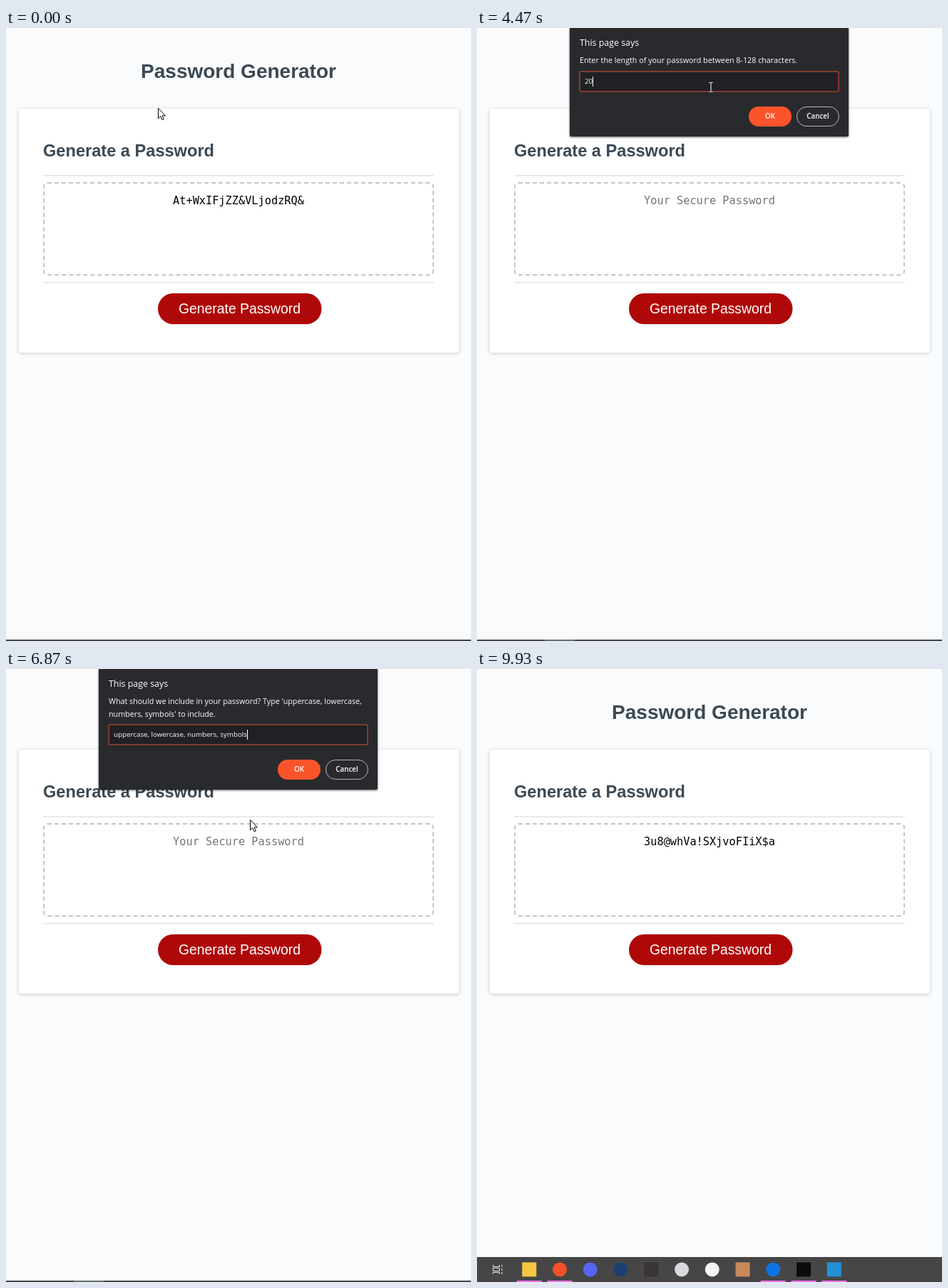
An HTML page for the animation above (9990 ms loop, 652 by 859 pixels).

```html
<!DOCTYPE html>
<html lang="en">
<head>
<meta charset="utf-8">
<title>Password Generator</title>
<style>
html, body { margin: 0; width: 100%; height: 100%; overflow: hidden; background: #fafbfd; }
#stage { position: absolute; left: 0; top: 0; width: 652px; height: 859px; overflow: hidden; isolation: isolate; background: #fafbfd; }
#stage div, #stage svg { position: absolute; box-sizing: border-box; }
.card { left: 17.5px; top: 113px; width: 617px; height: 342px; border-radius: 4px; background: #fff;
  box-shadow: 0 1px 5px rgba(60,64,67,.28); }
.result { left: 52px; top: 216px; width: 548px; height: 131px; border: 2px dashed #c4c5ca; border-radius: 6px; }
.page { left: 0; top: 0; font-family: "Liberation Sans", Arial, sans-serif; }
.page .mono { font: 15.28px "DejaVu Sans Mono", monospace; }

.dialog { left: 130px; top: 0; width: 391px; background: #292a2d; color: #fff; transform-origin: 50% 0;
  border-radius: 0 0 2px 2px; box-shadow: 0 1px 3px rgba(0,0,0,.65); font: 10.75px/17.5px "Open Sans", sans-serif; }
.dialog .says { left: 14px; top: 12px; font-size: 12.4px; white-space: nowrap; }
.dialog .message { left: 14px; top: 37px; white-space: nowrap; }
.dialog .field { left: 13px; right: 13px; bottom: 62px; height: 30px; padding: 0 6px; border: 2px solid #7f3b2b;
  border-radius: 3px; background: #202124; font-size: 9.8px; line-height: 26px; white-space: nowrap; }
.dialog .field.blurred { border: 1px solid #424346; padding: 0 7px; line-height: 28px; background: #232427; }
.field i { display: inline-block; width: 1px; height: 14px; background: #fff; vertical-align: middle; }
.dialog .button { bottom: 14px; width: 60px; height: 28px; border-radius: 14px; text-align: center;
  font-weight: 600; font-size: 9.8px; line-height: 27px; }
.ok { left: 251px; background: #fb542b; }
.cancel { left: 318px; border: 1px solid #b4b5b7; line-height: 25px !important; }

#menu { left: 304px; top: 85px; width: 153px; height: 182px; background: #292a2d; color: #85868a;
  box-shadow: 2px 2px 3px rgba(0,0,0,.6); font: 10.1px/21px "Open Sans", sans-serif; }
#menu .row { left: 0; width: 100%; height: 21px; padding: 0 21px 0 21.5px; display: flex; justify-content: space-between; }
#menu .row.on b { color: #fff; }
#menu .row.on { color: #a3a4a7; }
#menu .row.hover { background: #3d3e42; }
#menu b { font-weight: 400; }
#menu .rule { left: 0; width: 100%; height: 1px; background: #404145; }

#taskbar { left: 0; top: 824px; }
.cursor { left: 0; top: 0; overflow: visible; width: 16px; height: 22px; }
#beam { mix-blend-mode: difference; }
</style>
</head>
<body>
<div id="stage">
  <div class="card"></div>
  <div class="result"></div>
  <svg class="page" width="652" height="859" text-anchor="middle">
    <g fill="#3b4954" font-weight="700">
      <text x="326" y="70" font-size="28">Password Generator</text>
      <text x="52" y="180" font-size="23.6" text-anchor="start">Generate a Password</text>
    </g>
    <path d="M52.500 206.800H600M52.500 356.600H600" stroke="#e6e6e8" stroke-width="1.750"/>
    <text id="password" class="mono" x="326" y="247"></text>
    <rect x="213" y="371.700" width="229.500" height="43.400" rx="21.700" fill="#af0808"/>
    <text x="327.500" y="399.500" font-size="19.350" fill="#fff">Generate Password</text>
  </svg>

  <svg id="taskbar" width="652" height="35">
    <rect width="652" height="35" fill="#464646"/>
    <rect id="active" x="95" width="42" height="35" fill="#6a726f"/>
    <path d="M22.500 11v2.500h9V11M22.500 24v-2.500h9V24M22.500 15.500h9v4h-9zM35 11v3M35 16v3M35 21v3" fill="none" stroke="#eee"/>
    <g id="icons"></g>
  </svg>

  <div class="dialog" id="lengthDialog" style="height:152px">
    <div class="says">This page says</div>
    <div class="message">Enter the length of your password between 8-128 characters.</div>
    <div class="field"><span></span><i></i></div>
    <div class="button ok">OK</div><div class="button cancel">Cancel</div>
  </div>
  <div class="dialog" id="kindDialog" style="height:169px">
    <div class="says">This page says</div>
    <div class="message">What should we include in your password? Type 'uppercase, lowercase,<br>numbers, symbols' to include.</div>
    <div class="field"><span></span><i></i></div>
    <div class="button ok">OK</div><div class="button cancel">Cancel</div>
  </div>
  <div id="menu"></div>

  <svg class="cursor" id="arrow"><path d="M.5.5v14.200l3.200-3 2.400 5.100 2.200-1-2.300-4.900h4.400z" fill="#fff" stroke="#000"/></svg>
  <svg class="cursor" id="beam"><path d="M-3-6.500h2.500l.5.500.5-.5H3M-3 6.500h2.500l.5-.5.5.5H3M0-6V6" fill="none" stroke="#fff" stroke-width="1.200"/></svg>
  <svg class="cursor" id="hand"><g transform="translate(-6)" stroke="#000">
    <path d="M4.500 13.500V2a1.400 1.400 0 0 1 2.800 0v5.500c0-1 2.400-1 2.600.4c.3-1 2.300-.8 2.500.5c.5-.7 2-.4 2 1v4.600c0 2-1.400 3-1.600 5v1.500h-8v-1.400c-.5-2-2.600-4-3.800-6.300c-.8-1.400.8-2.600 2-1.300z" fill="#fff"/>
    <path d="M7.300 7.500V11M9.900 8v3M12.400 8.500V11" fill="none"/></g></svg>
</div>

<script>
const LOOP = 9990, FRAME = 200 / 3;
const $ = id => document.getElementById(id);
const show = (el, on) => { el.style.visibility = on ? 'visible' : 'hidden'; };
const between = (t, a, b) => t >= a && t < b;

// Taskbar items: colour, round or square, running
const items = [
  ['#f5c542', 0, 1], ['#f4502a', 1, 1], ['#5865f2', 1, 0], ['#1b3f70', 1, 0],
  ['#3a3435', 0, 0], ['#d9d9de', 1, 0], ['#f4f4f4', 1, 0], ['#c98a5b', 0, 0],
  ['#0c74e0', 1, 1], ['#0c0c0c', 0, 1], ['#2490d8', 0, 1]
];
$('icons').innerHTML = items.map(([colour, round, running], i) => {
  const x = 73.3 + i * 42.75;
  return `<rect x="${x - 10}" y="7.500" width="20" height="20" rx="${round ? 10 : 1}" fill="${colour}"/>` +
    (running ? `<rect x="${x - 17.5}" y="33" width="35" height="2" fill="#fb70e6"/>` : '');
}).join('');

// Context menu: label, shortcut, enabled; null is a separator
const entries = [['Emoji', 'Win+Period', 1], null, ['Undo', 'Ctrl+Z'], null, ['Cut', 'Ctrl+X'],
  ['Copy', 'Ctrl+C'], ['Paste', 'Ctrl+V', 1], ['Delete', ''], null, ['Select all', 'Ctrl+A']];
let menuY = 3.5;
$('menu').innerHTML = entries.map(entry => {
  const top = menuY;
  menuY += entry ? 21 : 9.5;
  if (!entry) return `<div class="rule" style="top:${Math.round(top + 4)}px"></div>`;
  const [label, keys, on] = entry;
  return `<div class="row ${on ? 'on' : ''}" style="top:${top}px"><b>${label}</b><span>${keys}</span></div>`;
}).join('');
const rows = [...document.querySelectorAll('#menu .row')];

// Pointer path: time, x, y, and the shape held from then on
const path = [
  [0, 213, 112, 'arrow'], [130, 126, 9, 'arrow'], [200, 126, 9, ''],
  [870, 101, 5, 'arrow'], [1130, 290, 32, 'arrow'], [1270, 400, 58, 'beam'], [1330, 424, 62, 'beam'],
  [1400, 410, 69, 'beam'], [1470, 402, 95, 'arrow'], [1600, 375, 225, 'beam'], [1670, 362, 350, 'arrow'],
  [1730, 354, 388, 'hand'], [1800, 350, 408, 'hand'], [1870, 352, 411, 'hand'], [2130, 338, 401, 'hand'],
  [2270, 338, 401, 'hand'], [2400, 414, 428, 'hand'], [2470, 425, 432, 'hand'], [2870, 370, 140, 'arrow'],
  [3000, 335, 88, 'beam'], [3070, 328, 83, 'beam'], [4470, 328, 83, 'beam'], [4600, 365, 106, 'arrow'],
  [4730, 402, 126, 'arrow'], [4930, 405, 128, 'arrow'], [5070, 400, 158, 'arrow'], [5270, 335, 95, 'beam'],
  [5400, 309, 70, 'beam'], [5530, 309, 70, 'beam'], [5730, 304, 86, 'beam'], [5930, 304, 85, 'arrow'],
  [6730, 342, 211, 'arrow'], [7000, 342, 211, 'arrow'], [7470, 415, 141, 'arrow'], [7600, 415, 141, 'arrow'],
  [7800, 394, 174, 'arrow'], [8130, 390, 380, 'hand'], [8200, 393, 392, 'hand'], [8530, 393, 392, 'hand'],
  [8670, 441, 385, 'hand'], [8730, 441, 385, '']
];

function pointerAt(t) {
  const i = path.findLastIndex(key => key[0] <= t);
  const [t0, x0, y0, shape] = path[i];
  const [t1, x1, y1] = path[i + 1] || [LOOP, x0, y0];
  const k = (t - t0) / (t1 - t0);
  return { x: Math.round(x0 + (x1 - x0) * k), y: Math.round(y0 + (y1 - y0) * k), shape };
}

// The window tilts and fades while it opens or closes
function poseDialog(el, t, opened, closed) {
  const visible = between(t, opened, closed + 190);
  el.style.display = visible ? 'block' : 'none';
  if (!visible) return;
  let tilt, opacity;
  if (t >= closed) {
    tilt = (t - closed + 66) / 133;
    opacity = 1 - .18 * tilt ** 3;
  } else {
    const v = (t - opened) / 133;
    tilt = v > 2 ? 0 : 1.2 * Math.exp(-1.3 * v);
    opacity = Math.min(1, .4 + .8 * v);
  }
  el.style.opacity = opacity;
  el.style.transform = tilt
    ? `translateY(${-7.5 * tilt}px) perspective(1000px) rotateX(${3.9 * tilt}deg)` : 'none';
}

function fillField(dialog, text, caret) {
  dialog.querySelector('.field span').textContent = text;
  dialog.querySelector('.field i').style.opacity = caret ? 1 : 0;
}

// The caret toggles every 533 ms, starting visible
const blink = (t, since) => Math.floor((t - since + 5) / 533.4) % 2 === 0;

function render(time) {
  const t = Math.round(Math.floor((time + 3.4) / FRAME) * FRAME / 10) * 10;

  const empty = between(t, 670, 7730);
  const password = $('password');
  password.textContent = empty ? 'Your Secure Password' : t < 670 ? 'At+WxIFjZZ&VLjodzRQ&' : '3u8@whVa!SXjvoFIiX$a';
  password.setAttribute('fill', empty ? '#757575' : '#000');

  poseDialog($('lengthDialog'), t, 2270, 4930);
  fillField($('lengthDialog'), t < 4070 ? '' : t < 4470 ? '2' : '20',
    blink(t, t < 4070 ? 2270 : t < 4470 ? 4070 : 4470));

  poseDialog($('kindDialog'), t, 5130, 7730);
  const pasted = t >= 6870, blurred = t >= 7670;
  fillField($('kindDialog'), pasted ? 'uppercase, lowercase, numbers, symbols' : '',
    !blurred && blink(t, pasted ? 6870 : 5130));
  $('kindDialog').querySelector('.field').classList.toggle('blurred', blurred);

  const pointer = pointerAt(t);
  for (const shape of ['arrow', 'beam', 'hand']) {
    show($(shape), shape === pointer.shape);
    $(shape).style.transform = `translate(${pointer.x}px, ${pointer.y}px)`;
  }

  show($('menu'), between(t, 5930, 6870));
  for (const row of rows) {
    const y = pointer.y - 85 - row.offsetTop;
    row.classList.toggle('hover', y >= 0 && y < 21);
  }

  const rise = (t - 8930) / 270;
  const hidden = rise <= 0 ? 33 : rise >= 1 ? 0 : Math.round(33 * (1 - rise) ** 2);
  $('taskbar').style.transform = `translateY(${hidden}px)`;
  show($('active'), between(t, 730, 9930));
}

const start = performance.now();
function tick() {
  render((performance.now() - start) % LOOP);
  requestAnimationFrame(tick);
}
tick();
</script>
</body>
</html>
```
